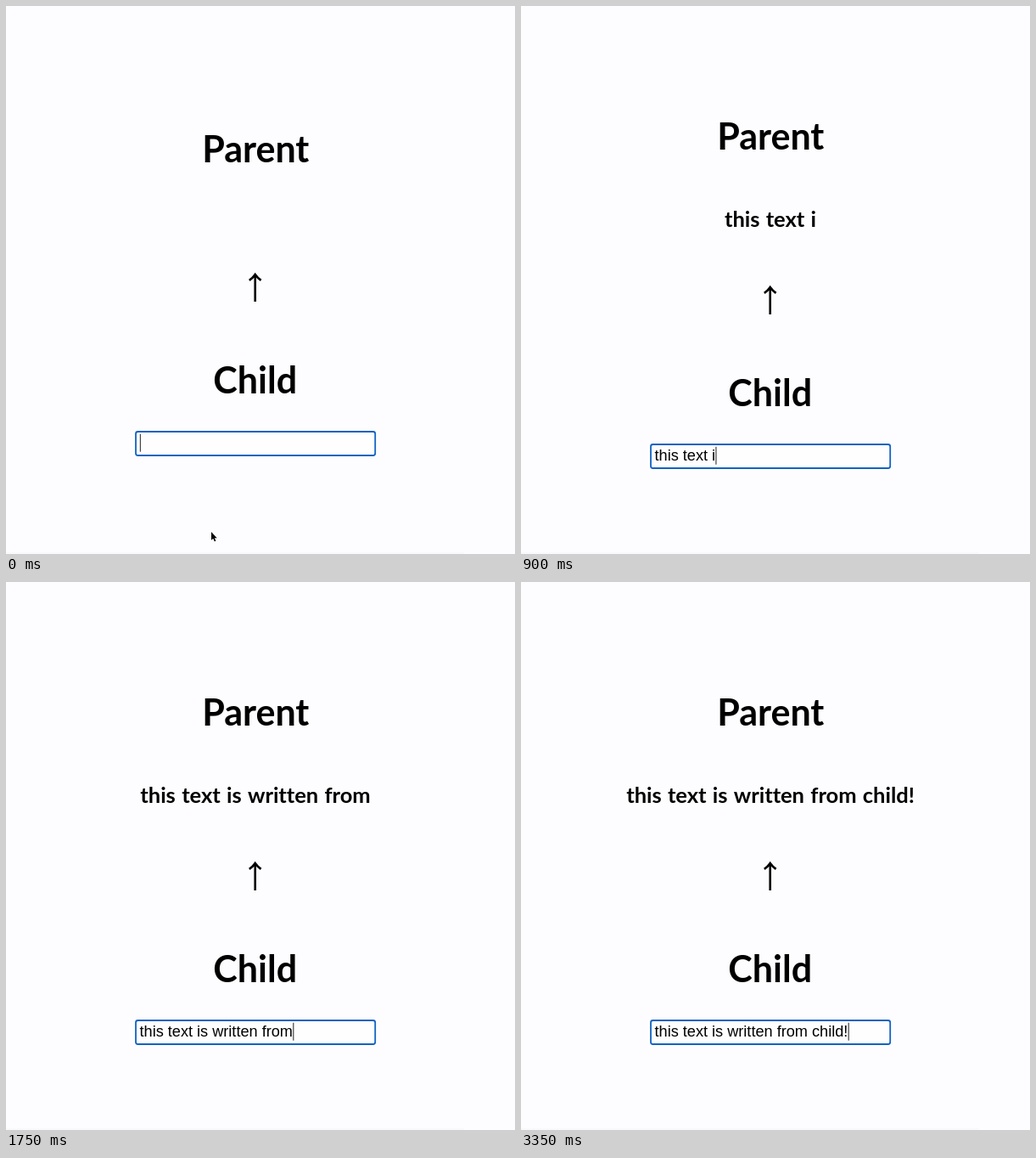
Write an HTML page with a canvas that moves like this. It is 600 px wide and 645 px high and loops after 3.4 s.

```html
<!DOCTYPE html>
<html lang="en">
<head>
<meta charset="utf-8">
<title>Child to parent</title>
<style>
  html, body { margin: 0; width: 100%; height: 100%; overflow: hidden; background: #fdfcfe; }
  canvas { display: block; }
</style>
</head>
<body>
<canvas id="stage" width="600" height="645"></canvas>
<script>
const ctx = document.getElementById('stage').getContext('2d');
const LOOP = 3400, CENTER = 294;
const MESSAGE = 'this text is written from child!';
const HEADING = '700 43px Lato, sans-serif';
const ECHO = '700 25.5px Lato, sans-serif';
const FIELD = '18.15px "Liberation Sans", Arial, sans-serif';

// Bursts of typing: [start ms, characters already there, offset of each key in ms]
const bursts = [
  [300, 0, [0, 50, 100, 150, 200, 250, 300, 350]],
  [750, 8, [0, 50, 150, 200, 250, 300, 350, 400, 450]],
  [1300, 17, [0, 50, 150, 200, 250, 350, 400, 450]],
  [1900, 26, [0, 50, 100, 200, 250]],
  [2350, 31, [0]]
];

function typedCount(t) {
  let count = 0;
  for (const [start, base, keys] of bursts) {
    if (t >= start) count = base + keys.filter(k => t >= start + k).length;
  }
  return count;
}

function caretVisible(t) {
  if (t < 300) return t < 150;
  return t < 2600 || Math.floor((t - 2600) / 250) % 2 === 1;
}

function write(text, font, x, y, align = 'center') {
  ctx.font = font;
  ctx.textAlign = align;
  ctx.fillText(text, x, y);
}

// A letter spacing other than zero also keeps "tt" from joining.
function writeEcho(text) {
  ctx.wordSpacing = '1.2px';
  ctx.letterSpacing = '-0.03px';
  write(text, ECHO, CENTER, 260);
  ctx.wordSpacing = ctx.letterSpacing = '0px';
}

function drawArrow(y) {
  ctx.strokeStyle = '#000';
  ctx.lineWidth = 2.6;
  ctx.stroke(new Path2D(`M293.7 ${y + 2}V${y + 34}M286.8 ${y + 8.8}Q291 ${y + 6} 293.7 ${y + 2}Q296.4 ${y + 6} 300.6 ${y + 8.8}`));
}

function drawField(y, text, caret) {
  ctx.beginPath();
  ctx.roundRect(153, y, 282.2, 28, 2.5);
  ctx.fillStyle = '#fefefe';
  ctx.fill();
  ctx.strokeStyle = '#1063c2';
  ctx.lineWidth = 1.8;
  ctx.stroke();
  ctx.fillStyle = '#000';
  write(text, FIELD, 157.5, y + 19, 'left');
  if (caret) {
    ctx.fillStyle = '#333';
    ctx.fillRect(157.8 + ctx.measureText(text).width, y + 2.7, 1.1, 21);
  }
}

function drawPointer() {
  const shape = new Path2D('M242 619V628.8L244.2 626.8L245.8 630.3L247.4 629.6L245.8 626.2H248.7Z');
  ctx.strokeStyle = '#fff';
  ctx.lineWidth = 1.4;
  ctx.stroke(shape);
  ctx.fillStyle = '#000';
  ctx.fill(shape);
}

function draw(t) {
  const text = MESSAGE.slice(0, typedCount(t));
  const shift = text ? 15 : 0;
  ctx.fillStyle = '#fdfcfe';
  ctx.fillRect(0, 0, 600, 645);
  ctx.fillStyle = '#f9f8fa';
  ctx.fillRect(0, 643, 540, 2);

  ctx.fillStyle = '#000';
  write('Parent', HEADING, CENTER + 0.3, 184 - shift);
  writeEcho(text.trimEnd());
  drawArrow(314 + shift);
  write('Child', HEADING, CENTER - 0.3, 456 + shift);
  drawField(501 + shift, text, caretVisible(t));
  if (!text) drawPointer();
}

function tick() {
  draw(performance.now() % LOOP);
  requestAnimationFrame(tick);
}
tick();
</script>
</body>
</html>
```
